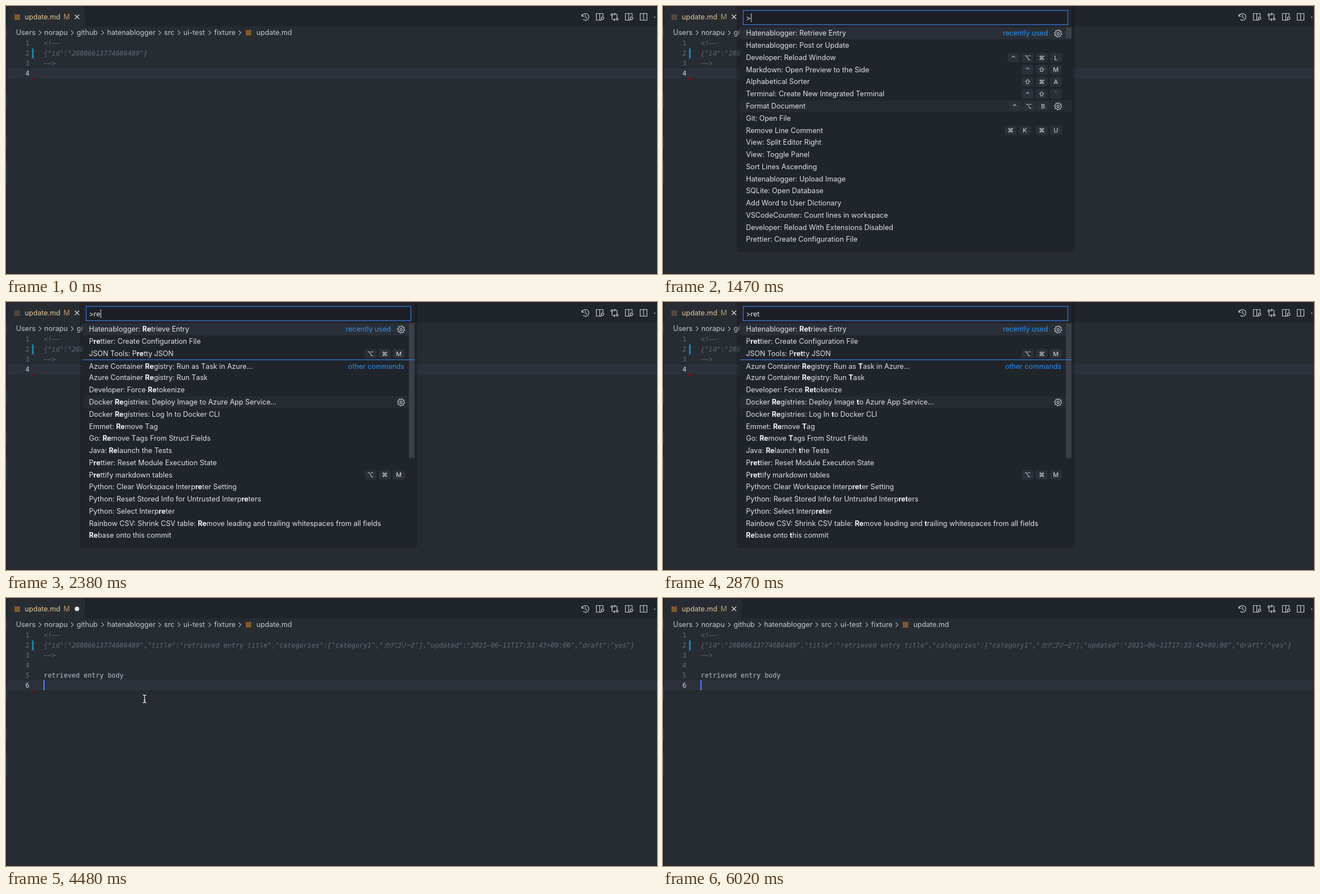
Write an HTML page with a canvas that moves like this. It is 1165 px wide and 481 px high and loops after 6510 ms.

```html
<!DOCTYPE html>
<html lang="en">
<head>
<meta charset="utf-8">
<style>
html, body { margin: 0; width: 100%; height: 100%; overflow: hidden; background: #272c33; }
canvas { display: block; }
</style>
</head>
<body>
<canvas width="1165" height="481"></canvas>
<script>
const ctx = document.querySelector('canvas').getContext('2d');
const LOOP = 6510, STEP = 70;
const UI = '12.63px Inter, "DejaVu Sans", sans-serif';
const KEY = '11px Inter, "DejaVu Sans", sans-serif';
const MONO = '11.88px "DejaVu Sans Mono", monospace';
const KANA = 'italic 11.88px "Noto Sans CJK JP", "Noto Sans CJK", sans-serif';
const PITCH = 7.15, LINE = 17.85, CODE_X = 67.5;
const BG = '#272c33', BAR = '#20242b', FG = '#e0e2e6', COMMENT = '#626974', BLUE = '#3d7bdc', LINK = '#2b90f5';

const OPENING = '{"id":"26006613774686489"';
const ENTRY = OPENING + ',"title":"retrieved entry title","categories":["category1","';
const ENTRY_END = '2"],"updated":"2021-06-11T17:33:43+09:00","draft":"yes"}';
const ENTRY_END_X = 724.5;

// label | keys
const recent = `Hatenablogger: Retrieve Entry
Hatenablogger: Post or Update
Developer: Reload Window|⌃⌥⌘L
Markdown: Open Preview to the Side|⌃⇧M
Alphabetical Sorter|⇧⌘A
Terminal: Create New Integrated Terminal|⌃⇧\`
Format Document|⌃⌥B
Git: Open File
Remove Line Comment|⌘K ⌘U
View: Split Editor Right
View: Toggle Panel
Sort Lines Ascending
Hatenablogger: Upload Image
SQLite: Open Database
Add Word to User Dictionary
VSCodeCounter: Count lines in workspace
Developer: Reload With Extensions Disabled
Prettier: Create Configuration File`.split('\n');

// asterisks enclose the matched letters
const matches = `Hatenablogger: *Ret*rieve Entry
P*ret*tier: Create Configuration File
JSON Tools: P*ret*ty JSON|⌥⌘M
Azure Container *Re*gistry: Run as *T*ask in Azure...
Azure Container *Re*gistry: Run *T*ask
Developer: Force *Ret*okenize
Docker *Re*gistries: Deploy Image *t*o Azure App Service...
Docker *Re*gistries: Log In *t*o Docker CLI
Emmet: *Re*move *T*ag
Go: *Re*move *T*ags From Struct Fields
Java: *Re*launch *t*he Tests
P*ret*tier: Reset Module Execution State
P*ret*tify markdown tables|⌥⌘M
Python: Clear Workspace Interp*ret*er Setting
Python: Reset Stored Info for Untrusted Interp*ret*ers
Python: Select Interp*ret*er
Rainbow CSV: Shrink CSV table: *Re*move leading and *t*railing whitespaces from all fields
*Re*base onto *t*his commit`.split('\n');

const within = (t, from, to) => t >= from && t < to;
const lineTop = n => 58.3 + LINE * (n - 1);

function rect(x, y, w, h, color, radius = 0) {
  ctx.fillStyle = color;
  ctx.beginPath();
  ctx.roundRect(x, y, w, h, radius);
  ctx.fill();
}

function text(s, x, y, color = FG, font = UI, align = 'left') {
  ctx.font = font;
  ctx.fillStyle = color;
  ctx.textAlign = align;
  ctx.fillText(s, x, y);
  return ctx.measureText(s).width;
}

function stroke(d, color = '#c9ccd2', width = 1.2) {
  ctx.strokeStyle = color;
  ctx.lineWidth = width;
  ctx.stroke(new Path2D(d));
}

function at(x, y, draw) {
  ctx.save();
  ctx.translate(x, y);
  draw();
  ctx.restore();
}

// Dashes are drawn full width so that neighbours join.
function code(s, n, italic = true, x = CODE_X) {
  text(s.replaceAll('-', '–'), x, lineTop(n) + 13, italic ? COMMENT : '#b9bfca', (italic ? 'italic ' : '') + MONO);
}

function toolbar() {
  const split = 'M-6-6H6V6H-6ZM0-6V6';
  const preview = 'M1 6H-6.5V-6H5.5V-1M-.5-6V6M7 2.5a2.3 2.3 0 1 0-4.6 0a2.3 2.3 0 1 0 4.6 0M3.2 4.3L1 6.8';
  const icons = [
    [1037, 'M-5.8-1A6 6 0 1 1-4 4.5M-6.5-5V-1H-2.5M0-3.5V.5L3 2.5'],
    [1063, preview],
    [1089, 'M-4.5-2V3.5Q-4.5 5 -3 5H1M-1 3L1 5L-1 7M4.5 2V-3.5Q4.5-5 3-5H-1M1-7L-1-5L1-3M-3-4a1.7 1.7 0 1 0-3.4 0a1.7 1.7 0 1 0 3.4 0M6.4 4a1.7 1.7 0 1 0-3.4 0a1.7 1.7 0 1 0 3.4 0'],
    [1115, preview],
    [1141, split]
  ];
  for (const [x, d] of icons) at(x, 19.5, () => stroke(d));
  rect(1160, 19, 2, 2, '#c9ccd2', 1);
}

function chrome(dirty, dimmed) {
  rect(0, 0, 1165, 481, BG);
  rect(0, 0, 1165, 37, BAR);
  rect(2, 1, 140, 36, BG);
  rect(142, 1, 1, 36, '#1a1d22');
  rect(0, 0, 1165, 1, '#1b1e24');
  rect(0, 479, 1165, 2, '#21252c');
  rect(0, 0, 1.5, 481, '#1d2127');
  for (const [y, h] of [[37, 21], [158, 23], [234, 22], [279, 42]]) rect(0, y, 1.5, h, '#333840');

  rect(15, 15, 10, 10, dimmed ? '#50473d' : '#80582f');
  text('update.md', 33.5, 24, '#e6c694');
  text('M', 103, 24, '#b39a76');
  if (dirty) rect(123, 15.5, 8, 8, '#e4e6e9', 4);
  else stroke('M123 15.5L131 23.5M131 15.5L123 23.5', '#d9dce0');
  toolbar();

  const crumbs = [[18, 'Users'], [68.5, 'norapu'], [126.5, 'github'], [181, 'hatenablogger'],
    [283, 'src'], [317.5, 'ui-test'], [372.5, 'fixture'], [448, 'update.md']];
  for (const [x, name] of crumbs) text(name, x, 52.3, '#c6cad0');
  for (const x of [61, 118.5, 173, 275, 309.5, 364.5, 418.5]) stroke(`M${x - 2} 44l4 4l-4 4`, '#a4a8b0', 1.1);
  rect(429, 43, 10, 10, '#80582f');
}

function selection() {
  const spans = [[2, 289, 843], [3, CODE_X, 28.6], [4, CODE_X, PITCH], [5, CODE_X, 143]];
  for (const [n, x, w] of spans) rect(x, lineTop(n), w, LINE, '#3c424e', 2);
}

function editor(t) {
  const filled = t >= 3430, selected = within(t, 3430, 4480);
  const last = !filled ? 4 : selected ? 5 : 6;
  rect(2, lineTop(last), selected ? 58 : 1163, LINE, '#2c313c');
  if (selected) selection();

  for (let n = 1; n <= last; n++) {
    text(n, 42, lineTop(n) + 13, n === last ? '#d3d6dc' : '#666d79', MONO, 'right');
  }
  code('<!--', 1);
  if (filled) {
    code(ENTRY, 2);
    ctx.letterSpacing = '-2px';
    text('カテゴリー', CODE_X + ENTRY.length * PITCH, lineTop(2) + 13, COMMENT, KANA);
    ctx.letterSpacing = '0px';
    code(ENTRY_END, 2, true, ENTRY_END_X);
    code('retrieved entry body', 5, false);
  } else {
    code(OPENING + '}', 2);
  }
  code('-->', 3);

  rect(46.5, lineTop(2), 3, LINE, '#1f88a6');
  const deletions = t < 3430 ? [4] : t < 3710 ? [3, 4, 5] : t < 3920 ? [5] : within(t, 4480, 5180) ? [6] : [];
  for (const n of deletions) {
    ctx.fillStyle = '#86131b';
    ctx.fill(new Path2D(`M45 ${lineTop(n + 1) - 2.5}l5 3l-5 3z`));
  }

  const caretOn = within(t, 560, 1050) || within(t, 3150, 3920) || within(t, 4480, 5320) || t >= 5810;
  if (caretOn) rect(selected ? 210 : 67, lineTop(last), 2, LINE, '#528bff');
}

function gear(x, y) {
  let d = '';
  for (let i = 0; i < 32; i++) {
    const r = i % 4 < 2 ? 6.5 : 5, a = (i + 0.5) * Math.PI / 16;
    d += `${i ? 'L' : 'M'}${r * Math.cos(a)} ${r * Math.sin(a)}`;
  }
  at(x, y, () => stroke(d + 'ZM2 0a2 2 0 1 0-4 0a2 2 0 1 0 4 0', '#c9ccd2', 1.1));
}

function keys(chord, right, y) {
  let x = right;
  for (const key of [...chord].reverse()) {
    if (key === ' ') { x -= 5; continue; }
    rect(x - 10.5, y - 8.5, 21, 17, '#2c3139', 3);
    text(key, x, y + 4, FG, KEY, 'center');
    x -= 25.3;
  }
}

// Bold letters are limited to the number typed so far.
function label(s, x, y, typed) {
  s.split('*').forEach((part, i) => {
    if (i % 2 === 0) { x += text(part, x, y); return; }
    const bold = part.slice(0, typed);
    typed -= bold.length;
    x += text(bold, x, y, '#f6f7f8', '700 ' + UI);
    x += text(part.slice(bold.length), x, y);
  });
}

function palette(t) {
  const typed = t < 2170 ? 0 : t < 2380 ? 1 : t < 2450 ? 2 : 3;
  const query = '>' + 'ret'.slice(0, typed);
  // A translucent rim of shadow around the solid panel.
  rect(132, -10, 604.5, 452, 'rgba(0,0,0,.18)', 8);
  rect(137.5, 0, 593.5, 436, BAR);

  rect(143.5, 8, 581, 25.5, '#1c2026');
  ctx.strokeStyle = BLUE;
  ctx.lineWidth = 1.2;
  ctx.strokeRect(143.5, 8, 581, 25.5);
  const width = text(query, 148.5, 25.5);
  if (t < 1890 || within(t, 2170, 2870)) rect(149 + width, 13, 1, 16, FG);

  rect(138, 38, 593, 21.8, '#2a2f37');
  rect(138, 168.8, 593, 21.8, '#262b32');
  rect(721, 38, 10, typed ? 242 : 20, '#3b4048');
  (typed ? matches : recent).forEach((row, i) => {
    const [name, chord = ''] = row.split('|');
    const hasGear = i === 0 || i === 6;
    const y = 49 + 21.77 * i + (typed && i === 3 ? 0.8 : 0);
    label(name, 148.5, y + 4.4, typed);
    keys(chord, hasGear ? 680 : 703, y);
    if (hasGear) gear(707, y + 0.3);
  });
  text('recently used', 689, 53.4, LINK, UI, 'right');
  if (typed) {
    rect(138, 103, 593, 1.2, BLUE);
    text('other commands', 713, 119.5, LINK, UI, 'right');
  }
}

const pointerPaths = [
  [[140, 376, 311], [280, 54, 31], [490, 47, 30], [770, 263, 190], [1190, 263, 190], [1330, 250, 183], [1400, 250, 183]],
  [[4480, 248, 181], [4550, 247, 175], [5250, 247, 175], [5600, 524, 434], [5740, 524, 434], [5950, 553, 470], [6020, 553, 470]]
];

function pointer(t) {
  const path = pointerPaths.find(p => within(t, p[0][0], p.at(-1)[0]));
  if (!path) return;
  const i = path.findIndex(p => p[0] > t);
  const [t0, x0, y0] = path[i - 1], [t1, x1, y1] = path[i];
  const u = (t - t0) / (t1 - t0), k = u * u * (3 - 2 * u);
  const isHand = within(t, 280, 1400);
  at(x0 + (x1 - x0) * k, y0 + (y1 - y0) * k, () => {
    if (isHand) {
      const hand = 'M-3.8-6.5Q-2.4-8-1.2-6.3L-.1-2.6Q1.2-3.5 2-2.1Q3.4-2.9 4.1-1.4Q6-1.7 6.2.3Q6.5 3.2 4.7 5.4V7.5H-1.5V6Q-3.2 4.5-4.2 2.5L-6 .6Q-6.4-1-4.6-.8L-2.6.8Z';
      stroke(hand, '#111', 2);
      ctx.fillStyle = '#fff';
      ctx.fill(new Path2D(hand));
      stroke('M.5 1.5V4.8M2.3 1.5V4.8M4 1.5V4.8', '#222', 0.8);
    } else {
      const beam = 'M-3-7Q0-7 0-5V5Q0 7-3 7M3-7Q0-7 0-5V5Q0 7 3 7M-1.5 2.5H1.5';
      stroke(beam, '#15181c', 3);
      stroke(beam, '#f2f2f2', 1.3);
    }
  });
}

function draw(now) {
  const t = Math.floor(now % LOOP / STEP) * STEP;
  const open = within(t, 1400, 3150);
  chrome(within(t, 3430, 3640) || within(t, 4480, 4970), open);
  editor(t);
  if (open) palette(t);
  pointer(t);
}

const start = performance.now();
function tick() {
  draw(performance.now() - start);
  requestAnimationFrame(tick);
}
tick();
</script>
</body>
</html>
```
